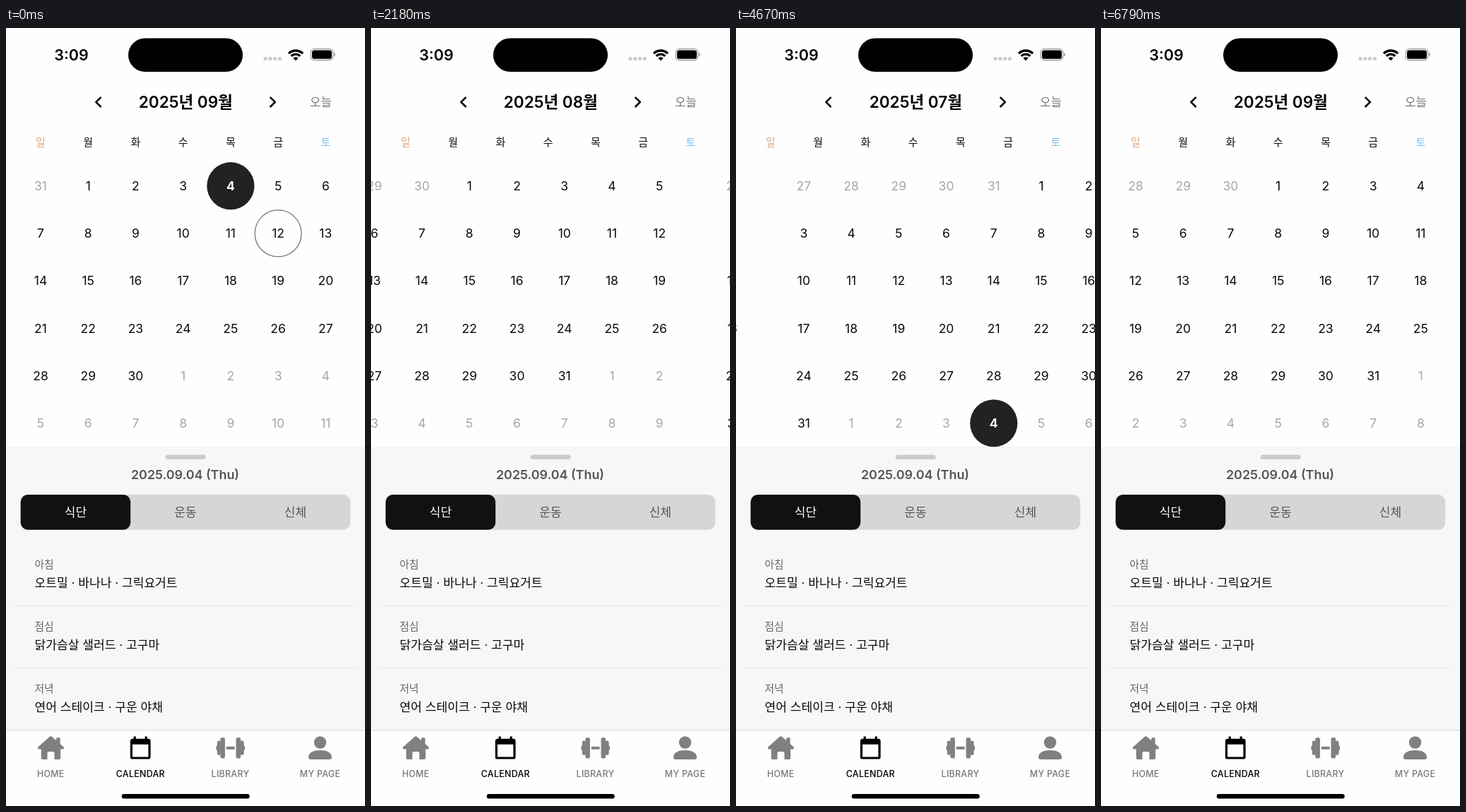
Write an HTML page that moves like this. It is 508 by 1102 pixels and loops after 6850 ms.

```html
<!DOCTYPE html>
<html lang="ko">
<head>
<meta charset="utf-8">
<title>Calendar</title>
<style>
html, body { margin: 0; width: 100%; height: 100%; overflow: hidden; background: #fefefe; }
svg { display: block; width: 100vw; height: 100vh; }
text { font-family: Inter, "Noto Sans CJK KR", "Noto Sans CJK", sans-serif; }
.mid { text-anchor: middle; }
.day { font-size: 17.5px; text-anchor: middle; fill: #0a0a0a; }
.out { fill: #a6a6a6; }
.picked { fill: #fff; font-weight: 700; }
.week { font-size: 15px; font-weight: 500; text-anchor: middle; }
.tab { font-size: 17px; text-anchor: middle; fill: #555; }
.label { font-size: 14.8px; fill: #666; }
.meal { font-size: 17.1px; fill: #080808; }
.nav { font-size: 12.4px; font-weight: 500; letter-spacing: .3px; text-anchor: middle; fill: #777; }
</style>
</head>
<body>
<svg viewBox="0 0 508 1102" preserveAspectRatio="none">
  <rect width="508" height="1102" fill="#fefefe"/>
  <g id="strip"></g>

  <!-- status bar -->
  <text class="mid" x="92.5" y="46" font-size="21.5" font-weight="600">3:09</text>
  <rect x="173" y="14.5" width="162" height="47.5" rx="23.75"/>
  <g fill="#ccc">
    <rect x="364.5" y="41" width="5" height="5" rx="1.5"/>
    <rect x="371.3" y="41" width="5" height="5" rx="1.5"/>
    <rect x="378.1" y="41" width="5" height="5" rx="1.5"/>
    <rect x="384.9" y="41" width="5" height="5" rx="1.5"/>
  </g>
  <g fill="none" stroke="#000" stroke-width="3.3">
    <path d="M400 36.1a14.2 14.2 0 0 1 20 0"/>
    <path d="M403.7 39.7a9 9 0 0 1 12.6 0"/>
  </g>
  <path d="M410 46.3l-3.6-3.6a5.1 5.1 0 0 1 7.2 0z"/>
  <rect x="431.2" y="29.6" width="31.6" height="16" rx="5" fill="none" stroke="#999" stroke-width="1.2"/>
  <rect x="433" y="31.4" width="28" height="12.4" rx="3.4"/>
  <path d="M464.2 35v5.4q1.8-.8 1.8-2.7t-1.8-2.7z" fill="#999"/>

  <!-- month header -->
  <g fill="none" stroke="#000" stroke-width="2.7" stroke-linecap="round" stroke-linejoin="round">
    <path d="M133.8 98.6l-6.4 6.3 6.4 6.3"/>
    <path d="M374.4 98.6l6.4 6.3-6.4 6.3"/>
  </g>
  <text id="title" class="mid" x="254.3" y="113" font-size="22.5" font-weight="600"></text>
  <text class="mid" x="445.5" y="111" font-size="16.8" fill="#777">오늘</text>
  <g id="week"></g>

  <!-- day sheet -->
  <rect y="594" width="508" height="402" fill="#f7f7f7"/>
  <rect y="593.5" width="508" height="1" fill="#f0f0f0"/>
  <rect x="225.7" y="604.5" width="57" height="6.5" rx="3.25" fill="#ccc"/>
  <text class="mid" x="253.5" y="638.5" font-size="17.9" font-weight="600" fill="#555">2025.09.04 (Thu)</text>
  <rect x="20.7" y="661" width="466.6" height="49.7" rx="10.3" fill="#d6d6d6"/>
  <rect x="20.7" y="661" width="155.5" height="49.7" rx="10.3" fill="#111"/>
  <text class="tab" x="98.5" y="692.3" style="fill:#fff;font-weight:500">식단</text>
  <text class="tab" x="254" y="692.3">운동</text>
  <text class="tab" x="409.5" y="692.3">신체</text>
  <g id="meals"></g>

  <!-- tab bar -->
  <rect y="994.5" width="508" height="107.5" fill="#fefefe"/>
  <rect y="994" width="508" height="1.2" fill="#dedede"/>
  <g fill="#808080">
    <path d="M61.6 1004q1.8-1.5 3.6 0l6 5.2v-2.7q0-1.2 1.2-1.2h3q1.2 0 1.2 1.2v7.5l4.8 4.3q1.4 1.5-.4 3.2h-3.8v12.5q0 2-2 2h-6.7v-9q0-2-2-2h-6q-2 0-2 2v9h-6.7q-2 0-2-2v-12.5h-3.800q-1.800-1.700-.4-3.200z"/>
    <g id="bell">
      <rect x="297.400" y="1016.500" width="4" height="6.500" rx="1.500"/>
      <rect x="298.800" y="1009.500" width="5" height="20.500" rx="2.400"/>
      <rect x="303.300" y="1005" width="6.600" height="29.500" rx="2.800"/>
    </g>
    <use href="#bell" transform="matrix(-1 0 0 1 635.400 0)"/>
    <rect x="311.800" y="1017.800" width="11.800" height="4"/>
    <circle cx="444.500" cy="1012" r="8.700"/>
    <path d="M428 1033c0-7 7.500-10 16.500-10s16.500 3 16.500 10q0 3-2.800 3h-27.400q-2.800 0-2.800-3z"/>
  </g>
  <path transform="translate(171 1002) scale(1.600)" d="M19 19H5V8h14m-3-7v2H8V1H6v2H5c-1.100 0-2 .9-2 2v14a2 2 0 0 0 2 2h14a2 2 0 0 0 2-2V5a2 2 0 0 0-2-2h-1V1"/>
  <text class="nav" x="63.300" y="1060.500">HOME</text>
  <text class="nav" x="190.300" y="1060.500" style="fill:#000">CALENDAR</text>
  <text class="nav" x="317.500" y="1060.500">LIBRARY</text>
  <text class="nav" x="444.500" y="1060.500">MY PAGE</text>
  <rect x="163.700" y="1085" width="181" height="6.500" rx="3.250"/>
</svg>
<script>
const $ = id => document.getElementById(id);
const W = 508, LOOP = 6850, CELL = 67.22, YEAR = 2025, FIRST = 5, TAU = 43;
const colX = c => 49 + CELL * c;

// month index is zero based: June to October
function page(month) {
  const lead = new Date(YEAR, month, 1).getDay();
  let out = "";
  for (let i = 0; i < 42; i++) {
    const date = new Date(YEAR, month, 1 - lead + i);
    const d = date.getDate(), m = date.getMonth();
    const x = colX(i % 7), y = 223.7 + CELL * Math.floor(i / 7);
    const picked = m === 8 && d === 4;
    if (picked) out += `<circle cx="${x}" cy="${y}" r="33.6" fill="#222"/>`;
    if (month === 8 && m === 8 && d === 12)
      out += `<circle cx="${x}" cy="${y}" r="33" fill="none" stroke="#777" stroke-width="1.3"/>`;
    const kind = picked ? "picked" : m === month ? "" : "out";
    out += `<text class="day ${kind}" x="${x}" y="${y + 6.2}">${d}</text>`;
  }
  return `<g transform="translate(${W * (month - FIRST)} 0)">${out}</g>`;
}

$("strip").innerHTML = [5, 6, 7, 8, 9].map(page).join("");

$("week").innerHTML = [..."일월화수목금토"].map((name, i) => {
  const fill = i === 0 ? "#e0a27c" : i === 6 ? "#74c4e8" : "#111";
  return `<text class="week" x="${colX(i)}" y="167" fill="${fill}">${name}</text>`;
}).join("");

$("meals").innerHTML = [
  ["아침", "오트밀 · 바나나 · 그릭요거트"],
  ["점심", "닭가슴살 샐러드 · 고구마"],
  ["저녁", "연어 스테이크 · 구운 야채"]
].map(([label, meal], i) => {
  const y = 88 * i;
  return `<text class="label" x="40.5" y="${764.7 + y}">${label}</text>
    <text class="meal" x="40.5" y="${792 + y}">${meal}</text>
    <rect x="10.5" y="${818 + y}" width="487" height="1.2" fill="#ebebeb"/>`;
}).join("");

// start, time the title follows, direction, delay to the halfway point
const swipes = [
  [1210, 1670, -1, 100],
  [1970, 2420, -1, 108],
  [2760, 3270, -1, 145],
  [3640, 4090, 1, 108],
  [4420, 4940, 1, 152],
  [5360, 5850, 1, 119],
  [6360, LOOP, 1, 108]
];

function swipe(t, mid) {
  const s = x => 1 / (1 + Math.exp((mid - x) / TAU));
  const base = s(-30);
  return t < 0 ? 0 : t >= 430 ? 1 : (s(t) - base) / (1 - base);
}

let shown;
function draw(t) {
  let pos = 8 - FIRST, month = 9;
  for (const [start, end, dir, mid] of swipes) {
    pos += dir * swipe(t - start, mid);
    if (t >= end) month += dir;
  }
  $("strip").setAttribute("transform", `translate(${-W * pos} 0)`);
  if (month !== shown) {
    shown = month;
    $("title").textContent = `${YEAR}년 ${String(month).padStart(2, "0")}월`;
  }
}

const t0 = performance.now();
function tick() {
  draw((performance.now() - t0) % LOOP);
  requestAnimationFrame(tick);
}
tick();
</script>
</body>
</html>
```
